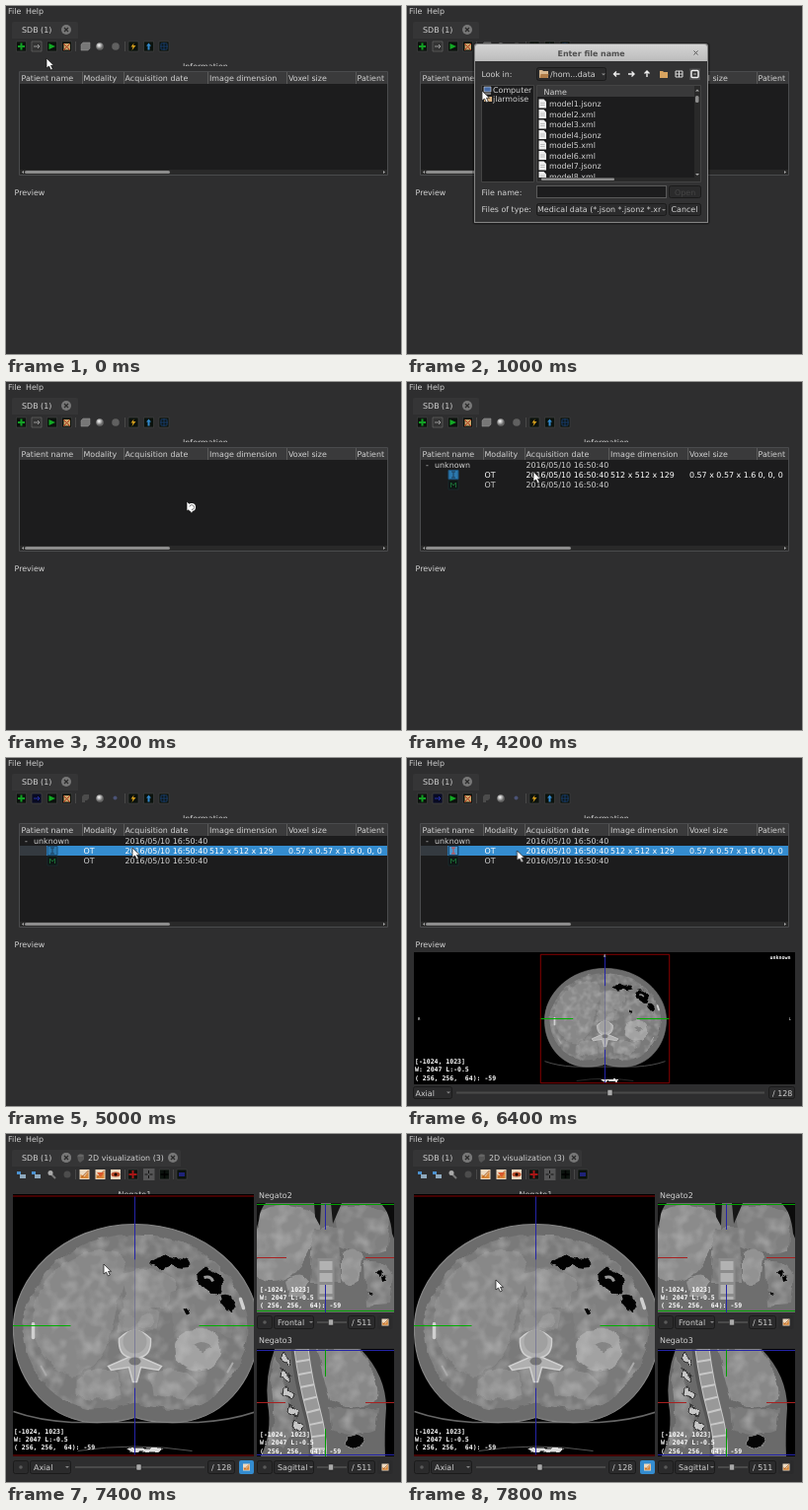
These frames come from a looping animation (400 by 353 pixels, 8000 ms). An HTML page:

```html
<!DOCTYPE html>
<html lang="en">
<head>
<meta charset="utf-8">
<title>Medical data browser</title>
<style>
html, body { margin: 0; width: 100%; height: 100%; overflow: hidden; background: #2e2e2f; }
svg { display: block; width: 100%; height: 100%; }
text { font: 7.93px "DejaVu Sans", sans-serif; fill: #d2d2d2; text-rendering: geometricPrecision; white-space: pre; }
.mono text { font: bold 6.5px "DejaVu Sans Mono", monospace; fill: #fff; }
.mono .tiny { font-size: 5px; }
.mono .side { font-size: 4px; fill: #bbb; }
.title { font-weight: bold; fill: #505050; }
.off { fill: #454545; }
.lit { fill: #fff; }
.line { fill: none; stroke-width: 1; vector-effect: non-scaling-stroke; }
.box { fill: #2b2b2c; stroke: #1b1b1b; }
.thumb { fill: #8c8c8c; }

/* hard cuts on a 200 ms grid: 2.5% per step */
.sdb, .viz, .dialog, .picked, .rows, .chosen, .idle, .preview, .scans, .busy, .red, .scroll, .bar, .pointer {
  animation: 8s step-end infinite;
}
.sdb { animation-name: sdb; }
.viz { animation-name: viz; }
.dialog { animation-name: dialog; }
.picked { animation-name: picked; }
.rows { animation-name: rows; }
.chosen { animation-name: chosen; }
.idle { animation-name: idle; }
.preview { animation-name: preview; }
.scans { animation-name: scans; }
.busy { animation-name: busy; }
.red { animation-name: red; }
.scroll { animation-name: scroll; }
.bar { animation-name: bar; }
.pointer { animation-name: pointer; }
@keyframes sdb { 0% { opacity: 1 } 90%, to { opacity: 0 } }
@keyframes viz { 0% { opacity: 0 } 90%, to { opacity: 1 } }
@keyframes dialog { 0% { opacity: 0 } 10% { opacity: 1 } 35%, to { opacity: 0 } }
@keyframes picked { 0% { opacity: 0 } 30%, to { opacity: 1 } }
@keyframes rows { 0% { opacity: 0 } 47.5%, to { opacity: 1 } }
@keyframes chosen { 0% { opacity: 0 } 55%, to { opacity: 1 } }
@keyframes idle { 0% { opacity: 1 } 55%, to { opacity: 0 } }
@keyframes preview { 0% { opacity: 0 } 65% { opacity: 1 } 85%, to { opacity: 0 } }
@keyframes scans { 0% { opacity: 0 } 92.5%, to { opacity: 1 } }
@keyframes busy { 0% { opacity: 0 } 35% { opacity: 1 } 47.5%, to { opacity: 0 } }
@keyframes red { 0% { opacity: 0 } 72.5% { opacity: 1 } 85%, to { opacity: 0 } }
@keyframes scroll {
  0% { transform: none } 17.5% { transform: translateY(-42px) } 20% { transform: translateY(-105px) }
  22.5% { transform: translateY(-157.5px) } 25%, to { transform: translateY(-178.5px) }
}
@keyframes bar {
  0% { transform: translateY(-64px) } 17.5% { transform: translateY(-49px) } 20% { transform: translateY(-26px) }
  22.5% { transform: translateY(-8px) } 25%, to { transform: none }
}
@keyframes pointer {
  0% { transform: translate(41px, 53px) }
  2.5% { transform: translate(31px, 49px) }
  5% { transform: translate(18px, 44px) }
  7.5% { transform: translate(15px, 42px) }
  12.5% { transform: translate(76px, 86px) }
  15% { transform: translate(170px, 146px) }
  17.5% { transform: translate(185px, 158px) }
  22.5% { transform: translate(187px, 161px) }
  27.5% { transform: translate(185px, 139px) }
  30% { transform: translate(183px, 130px) }
  37.5% { transform: translate(183px, 121px) }
  47.5% { transform: translate(176px, 115px) }
  50% { transform: translate(153px, 101px) }
  52.5% { transform: translate(128px, 91px) }
  72.5% { transform: translate(125px, 92px) }
  75% { transform: translate(118px, 93px) }
  77.5% { transform: translate(111.500px, 94px) }
  90% { transform: translate(109px, 108px) }
  92.5% { transform: translate(99px, 132px) }
  95%, to { transform: translate(90px, 148px) }
}
</style>
</head>
<body>
<svg viewBox="0 0 400 353" preserveAspectRatio="none">
<defs>
  <!-- uneven organ edges with faint light flecks -->
  <filter id="tissue" color-interpolation-filters="sRGB">
    <feTurbulence type="fractalNoise" baseFrequency=".07" numOctaves="2" seed="4" result="noise"/>
    <feDisplacementMap in="SourceGraphic" in2="noise" scale="9" xChannelSelector="R" yChannelSelector="G"/>
    <feGaussianBlur stdDeviation=".6" result="shape"/>
    <feColorMatrix in="noise" values="0 0 0 0 .75  0 0 0 0 .75  0 0 0 0 .75  1.2 0 0 0 -.5"/>
    <feComposite operator="in" in2="shape" result="flecks"/>
    <feMerge><feMergeNode in="shape"/><feMergeNode in="flecks"/></feMerge>
  </filter>
  <filter id="rough" color-interpolation-filters="sRGB">
    <feTurbulence type="fractalNoise" baseFrequency=".12" numOctaves="2" seed="2"/>
    <feDisplacementMap in="SourceGraphic" scale="7" xChannelSelector="R" yChannelSelector="G"/>
    <feGaussianBlur stdDeviation=".4"/>
  </filter>
  <linearGradient id="bar" x2="0" y2="1"><stop stop-color="#d4d4d4"/><stop offset="1" stop-color="#bcbcbc"/></linearGradient>
  <radialGradient id="ball" cx=".4" cy=".35"><stop stop-color="#fff"/><stop offset="1" stop-color="#666"/></radialGradient>
  <clipPath id="cut"><path d="M0 52H400V61H0z"/></clipPath>
  <clipPath id="list"><path d="M132 93H291V174H132z"/></clipPath>
  <clipPath id="combo"><path d="M131 200H257V213H131z"/></clipPath>
  <clipPath id="main"><path d="M7 61H251V327H7z"/></clipPath>
  <clipPath id="front"><path d="M254 70H393V181H254z"/></clipPath>
  <clipPath id="side"><path d="M254 218H393V327H254z"/></clipPath>

  <g id="close"><circle r="5" fill="#777"/><path d="M-2-2 2 2M2-2-2 2" stroke="#2a2a2a" stroke-width="1.300"/></g>
  <path id="tile" d="M-5-5H5V5H-5z" fill="#0b120d" stroke="#444" stroke-width=".6"/>
  <g id="file"><path d="M0 0H5L7.500 2.500V9H0z" fill="#eee"/><path d="M1.500 4H6M1.500 6H6" stroke="#aaa" stroke-width=".7"/></g>
  <g id="picture"><path d="M-5-5H5V5H-5z" fill="#ecd9c0"/><path d="M-4 4V0L0 2 4-3V4z" fill="#d98738"/><path d="M-3 3 4-4" stroke="#a8571c"/></g>
  <g id="handle"><rect x="-2.500" y="-3" width="5" height="6" rx="1" fill="#aaa" stroke="#222" stroke-width=".5"/></g>
  <g id="values" class="mono">
    <text y="0">[-1024, 1023]</text><text y="8.300">W: 2047 L:-0.5</text><text y="16.600">( 256, 256,  64): -59</text>
  </g>

  <!-- axial slice, centred on the crosshair -->
  <g id="axial">
    <path d="M-123 87Q-98 96-64 98H64Q98 96 123 87" fill="none" stroke="#666" stroke-width="1.500"/>
    <path d="M-123 4C-124-48-74-103 0-103C72-103 124-52 125 0C126 48 96 92 46 98Q18 99 0 93Q-18 99-46 98C-94 92-123 50-123 4z" fill="#6c6c6c" stroke="#858585" stroke-width="1.200"/>
    <g filter="url(#tissue)">
      <path d="M-113 4C-113-43-68-93 0-93C66-93 114-46 114 2C114 42 88 78 46 85Q20 84 0 78Q-20 84-46 85C-86 78-112 42-113 4z" fill="#7a7a7a"/>
      <path d="M-103 0C-106-50-58-84-16-75C-4-55-16-30-22-8C-24 24-45 52-66 50C-88 44-102 24-103 0z" fill="#888"/>
      <path d="M-14-52Q15-66 42-46L34-18-10-16zM-18-12Q0-26 25-13L22 5-16 5z" fill="#8a8a8a"/>
      <path d="M35-35Q65-50 103-25L97 12Q65 0 38 6z" fill="#808080"/>
      <path d="M-60 56Q-38 37-17 49L-14 70Q-36 80-60 70zM15 49Q45 38 66 56L50 75 18 70z" fill="#8c8c8c"/>
      <ellipse cx="64" cy="24" rx="24" ry="21" fill="#a2a2a2"/>
      <path d="M58 20Q67 14 78 22L67 27z" fill="#858585"/>
      <circle cx="11" cy="-5" r="8" fill="#959595"/><circle cx="-7" cy="-3" r="7" fill="#8f8f8f"/>
    </g>
    <path filter="url(#rough)" d="M17-66Q28-73 39-68Q53-72 57-61Q46-56 38-62Q27-55 17-61zM62-52Q70-64 82-55Q92-45 87-33Q78-28 74-38Q62-38 62-52zM87-31Q99-35 102-20L97-12 89-21zM49-17l5-2 2 4-4 3z" fill="#020202"/>
    <path d="M70-49Q77-51 79-45" fill="none" stroke="#999" stroke-width="3"/>
    <path d="M-16 13Q0-3 16 13Q17 29 6 32L27 41 24 45 6 42 2 57-2 57-6 42-24 45-27 41-6 32Q-17 29-16 13z" fill="#b0b0b0" stroke="#d0d0d0" stroke-width="1.500"/>
    <circle cy="16" r="12" fill="#a0a0a0"/><ellipse cy="36" rx="6" ry="4" fill="#777"/>
    <path d="M-103-2v14M107-27l3 9" stroke="#d0d0d0" stroke-width="3.500" stroke-linecap="round"/>
    <path d="M99 38l-5 9M-95 41l5 9" stroke="#aaa" stroke-width="2" stroke-linecap="round"/>
    <path d="M-58 127Q0 118 58 127" stroke="#555" fill="none"/>
    <path d="M-9 124H30L24 128H-4z" fill="#ddd" filter="url(#rough)"/>
    <path class="line" d="M-131.500-131.500H131.500V131.500H-131.500z" stroke="#880000"/>
    <path class="line" d="M0-131V-67M0 63V131" stroke="#2424a8"/>
    <path class="line" d="M0-67V63" stroke="#4a4a8c" opacity=".4"/>
    <path class="line" d="M-131 0H-65M65 0H131" stroke="#00b000"/>
  </g>
</defs>

<rect width="400" height="353" fill="#2e2e2f"/>
<text x="2" y="8">File</text><text x="20" y="8">Help</text>
<path d="M6 33V18Q6 16 8 16H71Q73 16 73 18V33z" fill="#353536"/>
<text x="16" y="27">SDB (1)</text><use href="#close" x="61" y="24"/>

<g class="sdb">
  <g id="tools"></g>
  <path d="M12 41H19M15.500 37.500V44.500" stroke="#12a024" stroke-width="2"/>
  <g class="idle"><path d="M26 36H36V46H26z" fill="#333" stroke="#666" stroke-width=".7"/><path d="M28 41h6m-2-2 2 2-2 2" class="line" stroke="#999"/></g>
  <g class="chosen"><path d="M26 36H36V46H26z" fill="#080a24" stroke="#444" stroke-width=".7"/><path d="M28 41h6m-2-2 2 2-2 2" class="line" stroke="#2530a8"/></g>
  <path d="M43.500 38 50 41 43.500 44z" fill="#12a824"/>
  <path d="M58.500 38H65V44.500H58.500z" fill="#c8a468"/><path d="M58 38l7 7M65 38l-7 7" class="line" stroke="#b0341c"/>
  <g class="idle"><path d="M76 39l2-2h7v6l-2 2H76z" fill="#777" stroke="#999" stroke-width=".5"/></g>
  <g class="chosen"><path d="M77 39l2-2h5v4l-2 2h-2v2h-3z" fill="#4c4c4c"/></g>
  <circle cx="95" cy="41" r="3.800" fill="url(#ball)"/><circle class="idle" cx="111" cy="41" r="3.800" fill="#606060"/>
  <circle class="chosen" cx="110.500" cy="40.500" r="2" fill="#4a5275"/>
  <path d="M70.500 36V46M120.500 36V46" class="line" stroke="#484848"/>
  <path d="M129.500 37.500l-3 4h2l-1 3.500 4-5h-2.500z" fill="#d8a01c"/>
  <path d="M144.500 37.500l2.500 3h-1.500v4h-2v-4h-1.500z" fill="#3288cc"/>
  <path d="M157 38h6v6h-6zM160 37v8M156 41h8" class="line" stroke="#183a66"/>
  <g clip-path="url(#cut)"><text x="179" y="64">Information</text></g>

  <path d="M13.500 66.500H386.500V171.500H13.500z" fill="#1c1c1d" stroke="#4a4b4d"/>
  <path d="M14 67H386V79H14z" fill="#3a3a3b"/>
  <path d="M77.500 67V79M119.500 67V79M204.500 67V79M284.500 67V79M354.500 67V79" class="line" stroke="#5a5a5a"/>
  <text x="15.500" y="75.500">Patient name</text><text x="78.500" y="75.500">Modality</text><text x="120.500" y="75.500">Acquisition date</text>
  <text x="206" y="75.500">Image dimension</text><text x="286" y="75.500">Voxel size</text><text x="355.500" y="75.500">Patient</text>
  <path d="M14 166H386V171H14z" fill="#292929"/>
  <rect x="19" y="167" width="147" height="3" rx="1.500" class="thumb"/>
  <path d="M18 167v3l-2-1.500zM382 167v3l2-1.500z" fill="#aaa"/>
  <text x="8.500" y="191.500">Preview</text>

  <g class="rows">
    <g class="chosen"><path d="M14 89H42V99H14z" fill="#343a40"/><path d="M41 89H386V99H41z" fill="#348ccf"/></g>
    <text x="19" y="86.500">-</text><text x="28" y="87">unknown</text>
    <text x="120.500" y="87">2016/05/10 16:50:40</text>
    <g class="lit" id="series"></g>
    <path d="M42 89.500H52V98.500H42z" fill="#2b78ae" stroke="#1c5078"/><path d="M45 91h4m-2 0v6m-2 0h4" class="line" stroke="#1c3c58"/>
    <g class="red"><path d="M42.500 89.500H51.500V98.500H42.500z" fill="#4b98d0" stroke="#1c5078"/><path d="M45 91h4m-2 0v6m-2 0h4" class="line" stroke="#d04840"/></g>
    <path d="M42 99.500H52V109H42z" fill="#0e1714" stroke="#1c3038" stroke-width=".6"/><path d="M44.500 107v-5l2.500 3 2.500-3v5" class="line" stroke="#1a6a34"/>
    <text x="78.500" y="107">OT</text><text x="120.500" y="107">2016/05/10 16:50:40</text>
  </g>

  <g class="preview">
    <path d="M7 197H393V331H7z"/>
    <use href="#axial" transform="translate(200.500 264.500) scale(.496)"/>
    <g class="mono">
      <text class="tiny" x="367.500" y="204">unknown</text><text class="side" x="11" y="265.500">R</text><text class="side" x="386.500" y="265.500">L</text>
      <text class="side" x="199" y="202">A</text><text class="side" x="199" y="329">P</text>
    </g>
    <use href="#values" x="8" y="310"/>
    <rect x="6.500" y="333.500" width="39" height="12" rx="2" class="box"/><text x="8.500" y="342.500">Axial</text>
    <path d="M40 338.500h4l-2 2z" fill="#888"/>
    <path d="M50 339.500H362" stroke="#4a4a4a" stroke-width="2"/><use href="#handle" x="205.500" y="339.500"/>
    <rect x="366.500" y="333.500" width="26" height="12" rx="2" class="box"/><text x="370" y="342.500">/ 128</text>
  </g>
</g>

<g class="viz">
  <path d="M68 33V18Q68 16 70 16H175Q177 16 177 18V33z" fill="#353536"/>
  <use href="#close" x="61" y="24"/><path d="M72 22l3-2 4 1v5l-4 3-2-2z" fill="#555"/><path d="M73 22h5" stroke="#777"/>
  <text x="83" y="27">2D visualization (3)</text><use href="#close" x="169" y="24"/>
  <path d="M11 38h4v3h-4zM26 38h4v3h-4z" fill="#4b91cf"/><path d="M14 41h6v4h-6zM29 41h6v4h-6z" fill="#8fa9bd"/>
  <path d="M44 39l6 6" stroke="#777" stroke-width="2"/><circle cx="45" cy="39.500" r="2.500" fill="#aaa"/>
  <circle cx="62" cy="41" r="3.500" fill="#4c4c4c"/>
  <use href="#picture" x="79.500" y="41"/><use href="#picture" x="95.500" y="41"/>
  <path d="M92 39h7l-3 5z" fill="#d8582c"/>
  <path d="M106 36h10v10h-10z" fill="#ecd9c0"/><ellipse cx="111" cy="41" rx="4.500" ry="2.500" fill="#b84a28"/><circle cx="111" cy="41" r="1.500"/>
  <g><use href="#tile" x="128.500" y="41"/><use href="#tile" x="160.500" y="41"/><use href="#tile" x="178" y="41"/></g>
  <path d="M139 35H150.500V47H139z" fill="#555556"/>
  <path d="M128.500 37v8M124.500 41h8" stroke="#a81616" stroke-width="2"/>
  <path d="M144.500 37v3m0 2v3M140.500 41h3m2 0h3" class="line" stroke="#111"/>
  <path d="M160.500 37v8M156.500 41h8" stroke="#000" stroke-width="1.500"/>
  <path d="M175 39h6v4h-6z" fill="#1e2278"/>
  <path d="M70.500 36V46M120.500 36V46M169.500 36V46" class="line" stroke="#484848"/>
  <g clip-path="url(#cut)"><text x="113.500" y="64">Negato1</text></g>
  <text x="256" y="64.500">Negato2</text><text x="256" y="212">Negato3</text>
  <path d="M7 61H251V327H7zM254 70H393V181H254zM254 218H393V327H254z"/>

  <g class="scans">
    <g clip-path="url(#main)"><use href="#axial" x="130.500" y="194.500"/></g>
    <g clip-path="url(#front)">
      <path d="M254 70H393V181H254z" fill="#6e6e6e"/>
      <g filter="url(#tissue)">
        <path d="M254 82Q268 69 292 73Q319 78 317 96Q309 125 290 143Q270 156 254 145z" fill="#8b8b8b"/>
        <path d="M331 75Q362 68 388 82L386 119Q362 127 336 113z" fill="#808080"/>
        <path d="M312 96H336L340 150H308z" fill="#7c7c7c"/>
        <path d="M340 121Q352 112 361 126L358 150Q346 160 340 145zM283 149Q298 136 307 149L301 166 287 166z" fill="#929292"/>
        <path d="M363 130Q381 125 391 143L388 172 365 174z" fill="#7e7e7e"/>
      </g>
      <path d="M312 70H319L318 93 313 84zM329 70H340L331 91z" fill="#161616"/>
      <path d="M254 70H263Q257 76 256 88L254 95zM393 70H379Q389 79 391 101L393 106z" fill="#0b0b0b"/>
      <path d="M324 126V168" stroke="#8c8c8c" stroke-width="17"/>
      <path d="M324 129V168" stroke="#b2b2b2" stroke-width="13" stroke-dasharray="9 3"/>
      <path filter="url(#rough)" d="M375 140l4-3 3 5-4 3zM380 145l4-3 2 6-5 2zM367 161l5-1 1 4z"/>
      <path class="line" d="M254 71.500H393M254 179.500H393" stroke="#00a000"/>
      <path class="line" d="M254 125.500H284M364 125.500H393" stroke="#a82020"/>
      <path class="line" d="M323.500 71V97M323.500 153V181" stroke="#2424a8"/>
    </g>
    <g clip-path="url(#side)">
      <path d="M272 218H359Q385 245 385 278Q383 305 384 327H258Q270 302 265 274Q262 245 272 218z" fill="#6a6a6a"/>
      <g filter="url(#tissue)">
        <path d="M314 218H357Q380 249 377 269Q352 285 328 270z" fill="#888"/>
        <path d="M327 277Q352 281 377 276L374 302Q350 310 329 300z" fill="#7b7b7b"/>
        <path d="M272 222Q288 260 291 300L280 320 266 315Q276 270 267 250z" fill="#7b7b7b"/>
      </g>
      <path d="M291 218Q294 252 302 278T309 327" fill="none" stroke="#555" stroke-width="5"/>
      <path d="M299 218Q303 250 311 280T317 327" fill="none" stroke="#c8c8c8" stroke-width="15"/>
      <path d="M299 218Q303 250 311 280T317 327" fill="none" stroke="#999" stroke-width="13" stroke-dasharray="11 2"/>
      <path filter="url(#rough)" d="M280 221l9 8-2 5-8-5zM279 238l10 8-2 5-9-5zM282 256l10 8-2 5-9-5zM287 274l10 7-2 5-9-4zM292 290l9 7-3 5-8-5z" fill="#c8c8c8" stroke="#222"/>
      <path filter="url(#rough)" d="M346 307Q356 301 361 308L359 317Q350 322 344 316z" fill="#050505" stroke="#aaa" stroke-width=".7"/>
      <path class="line" d="M254 219.500H393M254 325.500H393" stroke="#2424a8"/>
      <path class="line" d="M254 272.500H283M364 272.500H393" stroke="#a82020"/>
      <path class="line" d="M323.500 219V246M323.500 299V327" stroke="#00a000"/>
    </g>
    <use href="#values" x="8" y="303.500"/><use href="#values" x="257" y="159.500"/><use href="#values" x="257" y="307"/>
  </g>
  <g id="controls"></g>
</g>

<g class="dialog">
  <rect x="66" y="37" width="241" height="185" rx="4" fill="#000" opacity=".25"/>
  <path d="M68 220V41Q68 38 71 38H302Q305 38 305 41V220z" fill="#858585"/>
  <path d="M69 56V42Q69 39 72 39H301Q304 39 304 42V56z" fill="url(#bar)"/>
  <path d="M69 56H304V219H69z" fill="#323233"/>
  <text class="title" x="152.500" y="51">Enter file name</text>
  <path d="M290.500 45.500l4 4m0-4-4 4" class="line" stroke="#555"/>
  <text x="75.500" y="71.500">Look in:</text>
  <rect x="131.500" y="62.500" width="70" height="13" rx="2" class="box"/><text x="145" y="71.500">/hom...data</text>
  <path d="M134 65h3l1 1h5v7h-9z" fill="#d8b890"/><path d="M135.500 69h8l-1 4h-8z" fill="#b07c48"/><path d="M197 68.500h4l-2 2z" fill="#888"/>
  <path d="M215.500 69h-6m2.500-2.500-2.500 2.500 2.500 2.500M224 69h6m-2.500-2.500 2.500 2.500-2.500 2.500M243 72v-6m-2.500 2.500 2.500-2.500 2.500 2.500" fill="none" stroke="#eee" stroke-width="1.400"/>
  <path d="M256 66h3l1 1h4v6h-8z" fill="#d8a460"/>
  <path d="M286 63.500H297V75H286z" fill="#4b4b4c"/>
  <path d="M272 66h7v6h-7zM275.500 66v6M272 69h7" class="line" stroke="#ddd"/>
  <rect x="288" y="65.500" width="7" height="7" rx="1" fill="#333" stroke="#eee" stroke-width="1.500"/><path d="M290 69h3" stroke="#bbb"/>
  <path d="M75.500 80.500H128.500V178.500H75.500zM131.500 80.500H297.500V178.500H131.500z" fill="#1c1c1d" stroke="#444"/>
  <path d="M78 82h7v5h-7z" fill="#4469a5" stroke="#ddd" stroke-width=".6"/><path d="M79 89h6" stroke="#ccc"/>
  <path d="M78 91h3l1 1h4v5h-8z" fill="#d8b080"/>
  <text x="87" y="87.500">Computer</text><text x="87" y="96.500">jlarmoise</text>
  <path d="M132 81H297V92H132z" fill="#39393a"/><text x="138.500" y="89.500">Name</text>
  <g clip-path="url(#list)">
    <path class="picked" d="M132 126H291V136H132z" fill="#348ccf"/>
    <g class="scroll" id="files"></g>
  </g>
  <path d="M291 81H297V174H291zM132 174H297V178H132z" fill="#292929"/>
  <rect x="136" y="174.500" width="74" height="2.500" rx="1" class="thumb"/>
  <g class="bar"><rect x="292" y="155" width="3.500" height="7" rx="1.500" class="thumb"/></g>
  <path d="M292 86.500h4l-2-2zM292 170h4l-2 2z" fill="#aaa"/>
  <text x="75.500" y="191.500">File name:</text>
  <rect x="131.500" y="182.500" width="131" height="12" fill="#1d1d1e" stroke="#5a5a5a"/>
  <text class="picked" x="134" y="191.500">sphere.jsonz</text>
  <rect x="265.500" y="182.500" width="32" height="12" rx="2" class="box"/>
  <text class="off" x="271" y="191.500">Open</text><text class="picked" x="271" y="191.500">Open</text>
  <text x="75.500" y="209">Files of type:</text>
  <rect x="131.500" y="200.500" width="131" height="12" rx="2" class="box"/>
  <g clip-path="url(#combo)"><text x="132" y="209">Medical data (*.json *.jsonz *.xml)</text></g>
  <path d="M258 206h4l-2 2z" fill="#888"/>
  <rect x="265.500" y="200.500" width="32" height="12" rx="2" class="box"/><text x="267.500" y="209">Cancel</text>
</g>

<g class="pointer">
  <path d="M0 0V10L2.500 8 4.500 12 6.300 11 4.500 7.300H7.500z" fill="#fff" stroke="#111" stroke-width=".7"/>
  <g class="busy"><circle cx="5" cy="6" r="4" fill="#fff"/><path d="M2.800 5.500a2.400 2.400 0 1 1 2 3" class="line" stroke="#777"/></g>
</g>
</svg>
<script>
const fill = (id, items, draw) => {
  document.getElementById(id).innerHTML = items.map(draw).join("");
};
const label = (x, y, text, type = "") => `<text class="${type}" x="${x}" y="${y}">${text}</text>`;

fill("tools", [15.5, 46.5, 61.5, 129, 144.5, 160], x => `<use href="#tile" x="${x}" y="41"/>`);

fill("series", [[78.5, "OT"], [120.5, "2016/05/10 16:50:40"], [206, "512 x 512 x 129"],
  [286, "0.57 x 0.57 x 1.6"], [355.5, "0, 0, 0"]], ([x, text]) => label(x, 97, text, "lit"));

const earlier = Array.from({ length: 17 }, (_, i) => `model${i + 1}.${i % 3 ? "xml" : "jsonz"}`);
const names = [...earlier, "solid.xml", "solid2.xml", "solid3.xml", "sphere.jsonz",
  "test.json", "test.jsonz", "tf.xml", "v8.jsonz"];
fill("files", names, (name, i) => {
  const y = 102 + i * 10.5;
  return `<use href="#file" x="133.5" y="${y - 7.5}"/>` + label(144, y, name, name === "tf.xml" ? "lit" : "");
});

// plane name, left edge, middle line, slider end, count position, count
const panels = [
  ["Axial", 7, 338, 201, 206, "128"],
  ["Frontal", 254, 191, 345, 348, "511"],
  ["Sagittal", 254, 338, 345, 348, "511"]
];
fill("controls", panels, ([name, left, y, end, count, total]) => {
  const wide = left === 7, start = wide ? 70 : 315;
  const right = wide ? 243.5 : 384;
  return `<rect x="${left + .5}" y="${y - 6.5}" width="15" height="13" rx="2" class="box"/>
    <circle cx="${left + 8}" cy="${y}" r="1.8" fill="#5a5a5a"/>
    <rect x="${left + 17.5}" y="${y - 6.5}" width="${wide ? 41 : 40}" height="13" rx="2" class="box"/>
    ${label(left + 21, y + 3, name)}
    <path d="M${left + 53} ${y - 1}h4l-2 2z" fill="#888"/>
    <path d="M${start} ${y}H${end}" stroke="#4a4a4a" stroke-width="2"/>
    <use href="#handle" x="${(start + end) / 2 - 1}" y="${y}"/>
    <rect x="${count - 1.5}" y="${y - 6.5}" width="27" height="13" rx="2" class="box"/>
    ${label(count + 2, y + 3, "/ " + total)}
    <rect x="${right - 7.5}" y="${y - 7}" width="15" height="14" rx="2" fill="${wide ? "#348ccf" : "#2b2b2c"}"/>
    <use href="#picture" transform="translate(${right} ${y}) scale(.7)"/>`;
});
</script>
</body>
</html>
```
